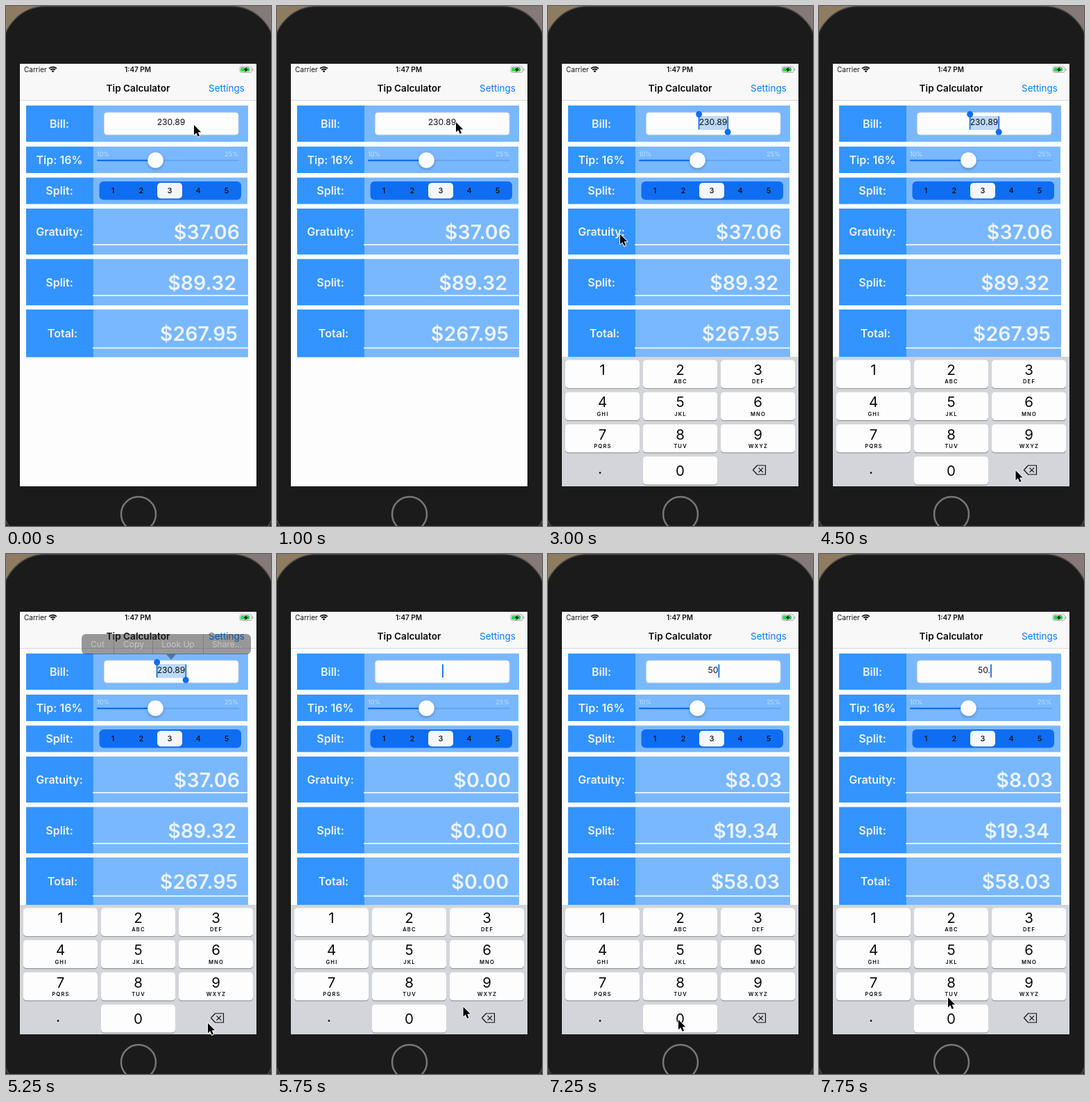
These frames come from a looping animation (382x747 px, 8000 ms). An HTML page with a canvas:

```html
<!DOCTYPE html>
<html lang="en">
<head>
<meta charset="utf-8">
<title>Tip Calculator</title>
<style>
html, body { margin: 0; width: 100%; height: 100%; overflow: hidden; background: #1b1b1b; }
canvas { display: block; width: 382px; height: 747px; }
</style>
</head>
<body>
<canvas id="stage" width="382" height="747"></canvas>
<script>
const ctx = document.getElementById('stage').getContext('2d');
const LOOP = 8000, STEP = 250;
const TIP_RATE = 0.16051, PEOPLE = 3;
const BLUE = '#0f6df2', PALE = '#eef4fc';

// Pointer waypoints: step, x, y
const POINTER = [
  [0, 271, 171], [4, 258, 167], [8, 253, 169], [10, 253, 169],
  [11, 9, 36], [12, 104, 328], [14, 281, 665], [17, 281, 665],
  [21, 291, 674], [22, 291, 674], [26, 201, 580], [27, 195, 575],
  [28, 190, 667], [29, 188, 669], [30, 80, 667], [31, 186, 637]
];
// Text in the bill field from a given step on
const TYPED = [[0, '230.89'], [23, ''], [27, '5'], [29, '50'], [30, '50.']];
const LETTERS = ['', 'ABC', 'DEF', 'GHI', 'JKL', 'MNO', 'PQRS', 'TUV', 'WXYZ'];

function rect(x, y, w, h, fill) {
  ctx.fillStyle = fill;
  ctx.fillRect(x, y, w, h);
}

function round(x, y, w, h, r, fill, stroke, line = 1) {
  ctx.beginPath();
  ctx.roundRect(x, y, w, h, r);
  if (fill) { ctx.fillStyle = fill; ctx.fill(); }
  if (stroke) { ctx.strokeStyle = stroke; ctx.lineWidth = line; ctx.stroke(); }
}

function disc(x, y, r, fill) {
  ctx.beginPath();
  ctx.arc(x, y, r, 0, Math.PI * 2);
  ctx.fillStyle = fill;
  ctx.fill();
}

function poly(points, fill) {
  ctx.beginPath();
  points.forEach(([x, y]) => ctx.lineTo(x, y));
  ctx.closePath();
  ctx.fillStyle = fill;
  ctx.fill();
}

function text(str, x, y, size, fill, weight = 400, align = 'center') {
  ctx.font = `${weight} ${size}px Inter, Roboto, sans-serif`;
  ctx.textAlign = align;
  ctx.fillStyle = fill;
  ctx.fillText(str, x, y);
}

function drawPhone() {
  const bg = ctx.createLinearGradient(0, 0, 382, 0);
  bg.addColorStop(0, '#8f7c60');
  bg.addColorStop(1, '#85797a');
  rect(0, 0, 382, 373, bg);
  rect(0, 373, 382, 374, '#2b2927');
  round(-5, 0.5, 392, 776, 62, '#1b1b1b', '#4a4a4a', 1.5);
  ctx.beginPath();
  ctx.arc(191, 730, 25, 0, Math.PI * 2);
  ctx.strokeStyle = '#777';
  ctx.lineWidth = 2.5;
  ctx.stroke();
}

function drawHeader() {
  rect(20, 83, 341, 607, '#fdfdfd');
  rect(20, 83, 341, 52, '#f8f8f8');
  rect(20, 135, 341, 1, '#d8d8d8');
  text('Carrier', 26, 95, 10, '#111', 400, 'left');
  text('1:47 PM', 190, 95, 10, '#111', 600);

  ctx.strokeStyle = '#111';
  ctx.lineWidth = 1.9;
  for (const r of [7.4, 4.5]) {
    ctx.beginPath();
    ctx.arc(67.5, 95, r, -Math.PI * 0.76, -Math.PI * 0.24);
    ctx.stroke();
  }
  poly([[65.6, 93.4], [67.5, 92.2], [69.4, 93.4], [67.5, 95.6]], '#111');

  round(337, 87, 17.5, 8.5, 2.5, '#fdfdfd', '#999', 0.8);
  round(338.2, 88.2, 13, 6.1, 1.5, '#38cf5f');
  rect(355.4, 89.8, 1, 3, '#999');
  poly([[347.5, 87.5], [342.5, 92], [345.4, 92], [344.2, 95.5], [349.2, 90.8], [346.3, 90.8]], '#111');

  text('Tip Calculator', 190.5, 122.5, 13.6, '#0b0b0b', 600);
  text('Settings', 344, 122.5, 13.5, '#0a7aff', 400, 'right');
}

function drawRow(label, y, h, base, right = 349, cx = 77) {
  rect(126, y, right - 126, h, '#79b8ff');
  rect(29, y, 97, h, '#3394ff');
  text(label, cx, base, 16, PALE, 600);
}

function drawResult(label, amount, y, h, base, right, lineY, cx) {
  drawRow(label, y, h, base - 5, y === 291 ? 348 : 349, cx);
  text('$' + amount.toFixed(2), right, base, 28.6, PALE, 600, 'right');
  rect(125, lineY, 224, 1.7, '#f4f9ff');
}

function drawSlider() {
  text('10%', 131, 216, 9, '#c5def9', 400, 'left');
  text('25%', 335, 216, 9, '#c5def9', 400, 'right');
  round(131, 220.7, 205, 2.2, 1.1, '#69a6ec');
  round(131, 220.7, 85, 2.2, 1.1, BLUE);
  ctx.save();
  ctx.shadowColor = 'rgba(0,0,0,.25)';
  ctx.shadowBlur = 4;
  ctx.shadowOffsetY = 2;
  disc(215.5, 221.5, 11.3, '#fdfdfd');
  ctx.restore();
}

function drawSegments() {
  round(134.5, 252, 204.5, 26.5, 6, BLUE);
  round(218, 254, 36, 22.5, 5, '#f5f6f8');
  for (let i = 0; i < 5; i++) text(i + 1, 154 + i * 41, 269.3, 11, '#0b0b0b', 500);
}

function drawField(str, caret, selected) {
  round(141.5, 153, 193.5, 32, 4, '#fdfdfd', '#d5dbe2', 0.8);
  ctx.font = '400 12.2px Inter, Roboto, sans-serif';
  const half = ctx.measureText(str).width / 2;
  const left = 238 - half, right = 238 + half;
  if (selected) rect(left, 158, half * 2, 20, '#bcdaf8');
  text(str, 238, 171, 12.2, '#111');
  if (caret || selected) rect(right, 158.5, 1.8, 19, BLUE);
  if (selected) {
    rect(left - 1, 157, 1.8, 20.5, BLUE);
    disc(left, 155.5, 4.5, BLUE);
    disc(right + 0.8, 181, 4.5, BLUE);
  }
}

function drawMenu(alpha) {
  ctx.save();
  ctx.globalAlpha = alpha;
  round(109, 115, 244, 29, 6, '#242424');
  poly([[231, 144], [245, 144], [238, 152]], '#242424');
  for (const x of [155, 211, 284]) rect(x, 115, 0.8, 29, '#555');
  [['Cut', 132], ['Copy', 184], ['Look Up', 248], ['Share...', 318.5]]
    .forEach(([s, x]) => text(s, x, 134, 12, '#fff'));
  ctx.restore();
}

function drawKeys(top) {
  ctx.save();
  ctx.beginPath();
  ctx.rect(20, 83, 341, 607);
  ctx.clip();
  ctx.translate(0, top);
  rect(20, 0, 341, 187, '#d3d5db');
  for (let i = 0; i < 10; i++) {
    const zero = i === 9;
    const col = zero ? 1 : i % 3, row = Math.floor(i / 3);
    const x = 25 + col * 112, y = 4.6 + row * 46.2, cx = x + 53.5;
    round(x, y + 1, 107, 40.5, 4.5, '#94969b');
    round(x, y, 107, 40.3, 4.5, '#fdfdfd');
    text(zero ? 0 : i + 1, cx, y + (zero ? 27.5 : 21.5), 20.5, '#0b0b0b');
    if (!zero) {
      ctx.letterSpacing = '1.2px';
      text(LETTERS[i], cx + 0.5, y + 33.8, 7.6, '#0b0b0b', 600);
      ctx.letterSpacing = '0px';
    }
  }
  text('.', 75, 168, 20, '#0b0b0b', 500);

  ctx.strokeStyle = '#111';
  ctx.lineWidth = 1.2;
  ctx.lineJoin = 'round';
  ctx.beginPath();
  [[295.5, 162.5], [301.5, 156], [313.5, 156], [313.5, 169], [301.5, 169]]
    .forEach(([x, y]) => ctx.lineTo(x, y));
  ctx.closePath();
  ctx.moveTo(303.5, 159.3); ctx.lineTo(310, 165.8);
  ctx.moveTo(310, 159.3); ctx.lineTo(303.5, 165.8);
  ctx.stroke();
  ctx.restore();
}

function drawPointer(x, y) {
  ctx.save();
  ctx.translate(x, y);
  ctx.beginPath();
  [[0, 0], [0, 14.2], [3.3, 11.2], [5.7, 16.8], [8, 15.8], [5.7, 10.3], [10.2, 10.3]]
    .forEach(([px, py]) => ctx.lineTo(px, py));
  ctx.closePath();
  ctx.lineJoin = 'round';
  ctx.strokeStyle = '#fff';
  ctx.lineWidth = 1.8;
  ctx.stroke();
  ctx.fillStyle = '#000';
  ctx.fill();
  ctx.restore();
}

function pointerAt(step) {
  const i = POINTER.findIndex(p => p[0] >= step);
  const b = POINTER[i], a = POINTER[Math.max(0, i - 1)];
  const k = b === a ? 0 : (step - a[0]) / (b[0] - a[0]);
  return [a[1] + (b[1] - a[1]) * k, a[2] + (b[2] - a[2]) * k];
}

// Critically damped slide-in
function keyboardTop(ms) {
  const u = Math.max(0, ms - 1600) / 1000 * 18.26;
  return 504 + 186 * (1 + u) * Math.exp(-u);
}

function draw(ms) {
  const step = Math.floor(ms / STEP), now = step * STEP;
  const bill = TYPED.filter(t => t[0] <= step).pop()[1];
  const amount = Number(bill) || 0;
  const tip = amount * TIP_RATE, total = amount + tip;
  const selected = step >= 10 && step < 23;
  const caret = step >= 6 && step !== 25 && step !== 26;

  drawPhone();
  drawHeader();
  drawRow('Bill:', 143, 52, 175);
  drawField(bill, caret, selected);
  drawRow('Tip: 16%', 202, 38, 227, 348);
  drawSlider();
  drawRow('Split:', 246.5, 38, 271, 348);
  drawSegments();
  drawResult('Gratuity:', tip, 291, 66, 335, 337, 342, 77);
  drawResult('Split:', total / PEOPLE, 363.5, 66.5, 408, 332, 415, 77);
  drawResult('Total:', total, 436, 68.5, 481, 334, 490.5, 81.5);
  if (now > 1600) drawKeys(keyboardTop(now));
  if (step === 21) drawMenu(0.46);
  if (step === 22) drawMenu(1);
  drawPointer(...pointerAt(step));
}

function tick() {
  draw(performance.now() % LOOP);
  requestAnimationFrame(tick);
}
tick();
</script>
</body>
</html>
```
